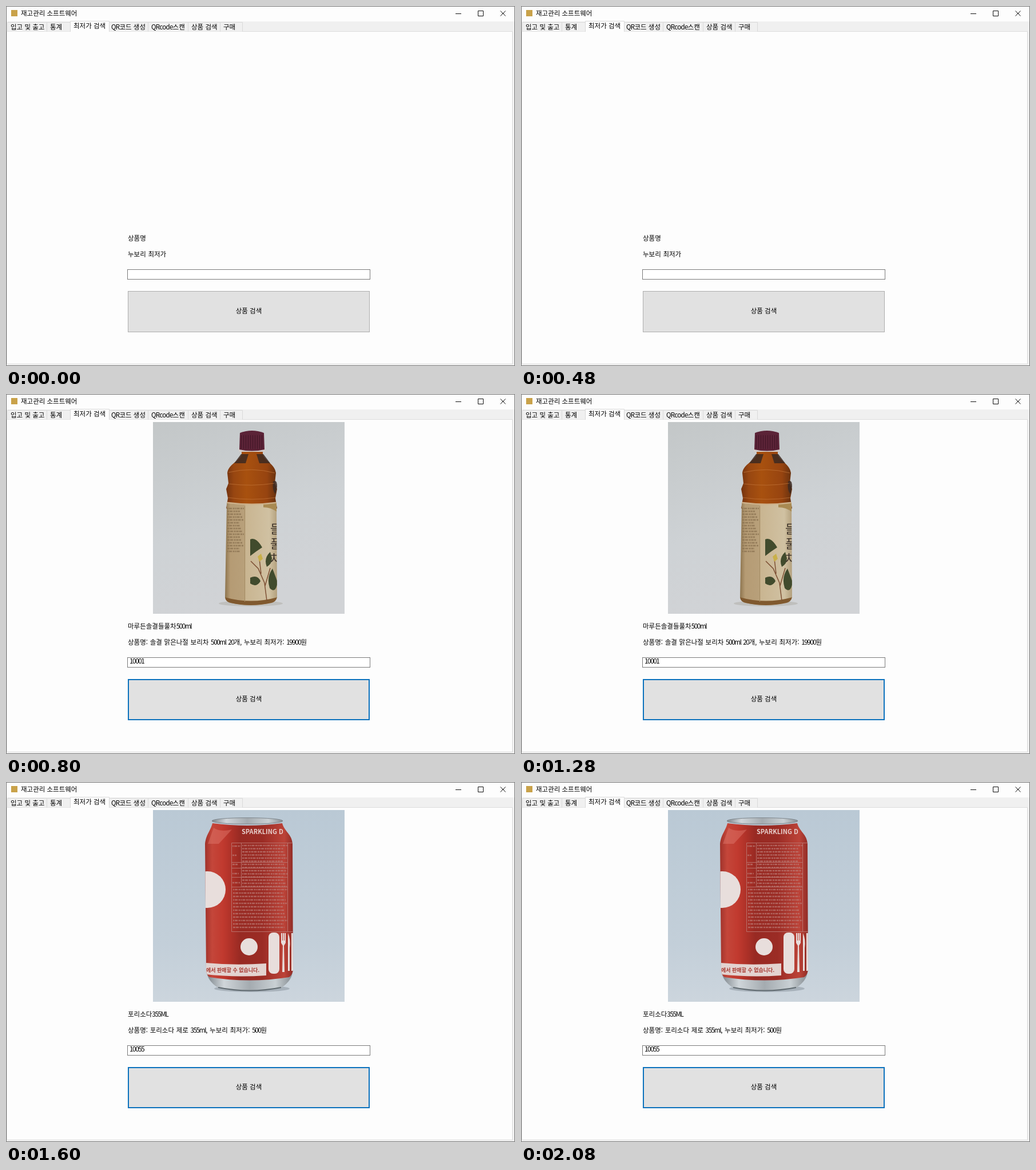
Recreate the animation shown at these times as an HTML page. Size 890 by 629 pixels, loop 2400 ms.

```html
<!DOCTYPE html>
<html lang="ko">
<head>
<meta charset="utf-8">
<style>
  html, body { margin: 0; width: 100%; height: 100%; overflow: hidden; background: #fdfdfd; }
  svg { display: block; width: 890px; height: 629px; }
  text { font: 11.5px "Noto Sans CJK KR", "Noto Sans CJK", sans-serif; fill: #000; }
  .letters { letter-spacing: -.7px; }
  .digits { letter-spacing: -1.3px; }
  #detail { word-spacing: .5px; }
</style>
</head>
<body>
<svg viewBox="0 0 890 629">
  <defs>
    <linearGradient id="studio" x2=".3" y2="1">
      <stop stop-color="#c3c7c8"/><stop offset=".6" stop-color="#ced2d5"/><stop offset="1" stop-color="#d1d3d6"/>
    </linearGradient>
    <linearGradient id="mist" x2="0" y2="1">
      <stop stop-color="#bac9d5"/><stop offset=".7" stop-color="#c3cfd9"/><stop offset="1" stop-color="#ccd5dd"/>
    </linearGradient>
    <linearGradient id="tea">
      <stop stop-color="#74330f"/><stop offset=".15" stop-color="#974611"/><stop offset=".4" stop-color="#a8510f"/><stop offset=".8" stop-color="#974410"/><stop offset="1" stop-color="#64300f"/>
    </linearGradient>
    <linearGradient id="paper">
      <stop stop-color="#8d744e"/><stop offset=".1" stop-color="#b59b74"/><stop offset=".37" stop-color="#b8a07a"/><stop offset=".4" stop-color="#c9b591"/><stop offset=".85" stop-color="#d0c1a2"/><stop offset="1" stop-color="#b3a07d"/>
    </linearGradient>
    <linearGradient id="red">
      <stop stop-color="#a0332b"/><stop offset=".08" stop-color="#c4463a"/><stop offset=".2" stop-color="#c13a2f"/><stop offset=".3" stop-color="#ae3128"/><stop offset=".4" stop-color="#982a23"/><stop offset=".65" stop-color="#9b2c25"/><stop offset=".9" stop-color="#bc4338"/><stop offset="1" stop-color="#902c26"/>
    </linearGradient>
    <linearGradient id="metal">
      <stop stop-color="#7d858b"/><stop offset=".2" stop-color="#d0d6da"/><stop offset=".5" stop-color="#a4abb0"/><stop offset=".8" stop-color="#c9d0d4"/><stop offset="1" stop-color="#858c91"/>
    </linearGradient>
    <clipPath id="labelShape"><path id="labelPath" d="M386 191Q430 197 473 191L474 355Q472 363 464 365Q428 373 393 365Q384 363 383 355Z"/></clipPath>
    <clipPath id="canShape"><path id="canPath" d="M361 72Q422 80 483 72C487 87 500 91 501 108L502 328Q501 337 495 341Q425 352 356 341Q350 337 350 328L348 108C350 91 357 87 361 72Z"/></clipPath>
  </defs>

  <path fill="#fdfdfd" d="M0 0H890V629H0Z"/>
  <path fill="#f0f0f0" d="M1 27H889V628H1Z"/>
  <path fill="#fdfdfd" stroke="#dcdcdc" d="M1.5 44.5H885.5V625.5H1.5Z"/>
  <g id="tabs"></g>
  <rect x="9" y="7" width="11" height="11" fill="#c9a24a"/>
  <text x="26" y="17">재고관리 소프트웨어</text>
  <path fill="none" stroke="#111" d="M786 13.5H796M825.5 8.5H834.5V17.5H825.5ZM864.5 8.5L873.5 17.5M873.5 8.5L864.5 17.5"/>
  <path fill="none" stroke="#707070" d="M.5 .5H889.5V628.5H.5Z"/>

  <g id="bottle">
    <rect x="257" y="49" width="335" height="335" fill="url(#studio)"/>
    <ellipse cx="428" cy="366" rx="56" ry="5" fill="#b5b2ae" opacity=".6"/>
    <path fill="#d3cdca" d="M407 94H453V101H407Z"/>
    <path fill="#5b2337" d="M409 68Q430 60 451 68L452 97Q430 102 408 97Z"/>
    <path stroke="#421526" stroke-width="24" stroke-dasharray="1 3" d="M411 84H450"/>
    <path fill="url(#tea)" d="M412 101H449V106C453 118 470 122 472 138L470 156L474 166L471 182L474 200H385L388 182L385 166L389 156L387 138C389 122 408 118 412 106Z"/>
    <path fill="#3c2a22" opacity=".85" d="M411 105H424L419 121H399ZM438 105H450L462 121H443ZM467 153Q474 148 474 162L471 175Q465 168 467 153Z"/>
    <path fill="none" stroke="#c2763a" opacity=".7" d="M389 137Q430 127 470 138M390 157Q430 162 469 156M388 181Q430 187 471 181"/>
    <path fill="none" stroke="#cdb08a" stroke-width="3" d="M386 190Q430 196 473 190"/>
    <use href="#labelPath" fill="url(#paper)"/>
    <g clip-path="url(#labelShape)">
      <path fill="#a98a52" d="M450 190H476V208Q465 198 450 198Z"/>
      <path fill="none" stroke="#80592f" stroke-width="8" d="M382 359Q428 372 475 359"/>
      <path stroke="#a58d64" d="M417.5 196V363"/>
      <g id="labelLines" stroke="#8a7250" opacity=".75"></g>
      <path fill="none" stroke="#7d5034" stroke-width="1.5" d="M456 361L452 330L441 305L428 292M446 314L443 288M453 335L462 304"/>
      <path fill="#414b2d" d="M427 254Q437 249 448 268Q437 275 427 283ZM427 321Q440 315 445 327Q438 339 427 331ZM462 276Q450 287 456 302Q465 297 465 287ZM466 305Q455 320 461 339Q471 350 475 329Z"/>
      <path fill="#c9b04a" d="M440 284L446 279L449 288L443 293Z"/>
      <g id="labelName"></g>
    </g>
  </g>

  <g id="can">
    <rect x="257" y="49" width="335" height="335" fill="url(#mist)"/>
    <ellipse cx="430" cy="361" rx="66" ry="6" fill="#929ca4" opacity=".6"/>
    <path fill="url(#metal)" d="M351 331H501Q500 347 482 359Q426 371 370 359Q352 347 351 331Z"/>
    <path fill="none" stroke="#606a70" stroke-width="2" d="M371 359Q426 370 481 359"/>
    <use href="#canPath" fill="url(#red)"/>
    <ellipse cx="422" cy="68" rx="62" ry="5.5" fill="url(#metal)" stroke="#7d858b"/>
    <g clip-path="url(#canShape)">
      <path fill="#e17b70" opacity=".45" d="M363 80Q374 88 395 83L372 108H353Z"/>
      <circle cx="352" cy="188" r="32" fill="#e8dedc"/>
      <circle cx="425" cy="288" r="15" fill="#e8dedc"/>
      <text x="412" y="91" style="font-weight:700;font-size:11px;fill:#e8d0cd">SPARKLING D</text>
      <path fill="none" stroke="#b9706a" d="M394.5 106.5H502M394.5 106.5V261.5H502M411.5 106.5V184M394.5 140.5H492M394.5 150.5H492M394.5 166.5H492M394.5 183.5H492M492.5 106V261"/>
      <g id="canLines" stroke="#bb7b75" opacity=".7"></g>
      <rect x="459" y="263" width="19" height="72" rx="8" fill="#e8dedc"/>
      <path fill="#e8dedc" d="M481 264H483V277H484V264H486V277H487V264H489V281L486 286L487 332H483L484 286L481 281ZM493 264Q498 275 496 290V330H493ZM499 264H502V330H499Z"/>
      <path fill="#e3d3d0" d="M348 316Q400 321 455 317V338Q400 342 348 336Z"/>
      <text x="350" y="332" style="font-weight:700;font-size:9px;fill:#a83a32">에서 판매할 수 없습니다.</text>
    </g>
  </g>

  <text id="product" x="213" y="409.5"></text>
  <text id="detail" x="213" y="437.5"></text>
  <rect x="212.5" y="460.5" width="424" height="17" fill="#fff" stroke="#7a7a7a"/>
  <text id="code" x="216" y="471"></text>
  <rect x="213.5" y="498.5" width="422" height="71" fill="#e1e1e1" stroke="#adadad"/>
  <rect id="focus" x="214" y="499" width="421" height="70" fill="none" stroke="#0c72bd" stroke-width="2"/>
  <text x="424.5" y="536.5" text-anchor="middle">상품 검색</text>
</svg>
<script>
const $ = id => document.getElementById(id);

// Latin runs are set tighter than the Hangul around them.
const tighten = s => s.replace(/[A-Za-z0-9]+/g, run =>
  `<tspan class="${/\d/.test(run) ? 'digits' : 'letters'}">${run}</tspan>`);

const tabs = [
  [2, 71, 8, '입고 및 출고'], [71, 112, 77, '통계'], [112, 180, 118, '최저가 검색'],
  [180, 248, 184, 'QR코드 생성'], [248, 318, 254, 'QRcode스캔'],
  [318, 374, 324, '상품 검색'], [374, 413, 380, '구매']
];
$('tabs').innerHTML = tabs.map(([left, right, textX, label], i) => {
  const active = i === 2, top = active ? 26.5 : 28.5, bottom = active ? 45 : 44.5;
  return `<path d="M${left + .5} ${bottom}V${top}H${right + .5}V${bottom}"
    fill="${active ? '#fdfdfd' : '#f0f0f0'}" stroke="#d9d9d9"/>
    <text x="${textX}" y="${active ? 39 : 40.5}">${tighten(label)}</text>`;
}).join('');

// Rows of dashes stand for fine print.
const finePrint = (left, right, top, bottom, step) => {
  let rows = '';
  for (let y = top, i = 0; y < bottom; y += step, i++)
    rows += `<path d="M${left} ${y}H${right - i * 7 % 9}" stroke-width="2.5"
      stroke-dasharray="${2 + i % 3} 1 5 1.5 3 1"/>`;
  return rows;
};
$('labelLines').innerHTML = finePrint(387, 416, 200, 280, 5);
$('canLines').innerHTML = finePrint(413, 492, 111, 183, 5.5) + finePrint(397, 492, 188, 260, 6)
  + finePrint(396, 410, 112, 183, 16);
$('labelName').innerHTML = [...'들풀차'].map((c, i) =>
  `<text x="462" y="${243 + i * 26}" style="font-size:21px;fill:#3b3028">${c}</text>`).join('');

const states = [
  { product: '상품명', detail: '누보리 최저가', code: '' },
  { product: '마루든솔결들풀차500ml', detail: '상품명: 솔결 맑은나절 보리차 500ml 20개, 누보리 최저가: 19900원', code: '10001' },
  { product: '포리소다355ML', detail: '상품명: 포리소다 제로 355ml, 누보리 최저가: 500원', code: '10055' }
];
const show = (id, on) => $(id).style.display = on ? '' : 'none';
let shown = -1;
function draw(now) {
  const step = Math.floor(now / 800) % states.length;
  if (step !== shown) {
    shown = step;
    for (const [id, value] of Object.entries(states[step])) $(id).innerHTML = tighten(value);
    show('bottle', step === 1);
    show('can', step === 2);
    show('focus', step > 0);
  }
  requestAnimationFrame(draw);
}
draw(performance.now());
</script>
</body>
</html>
```
